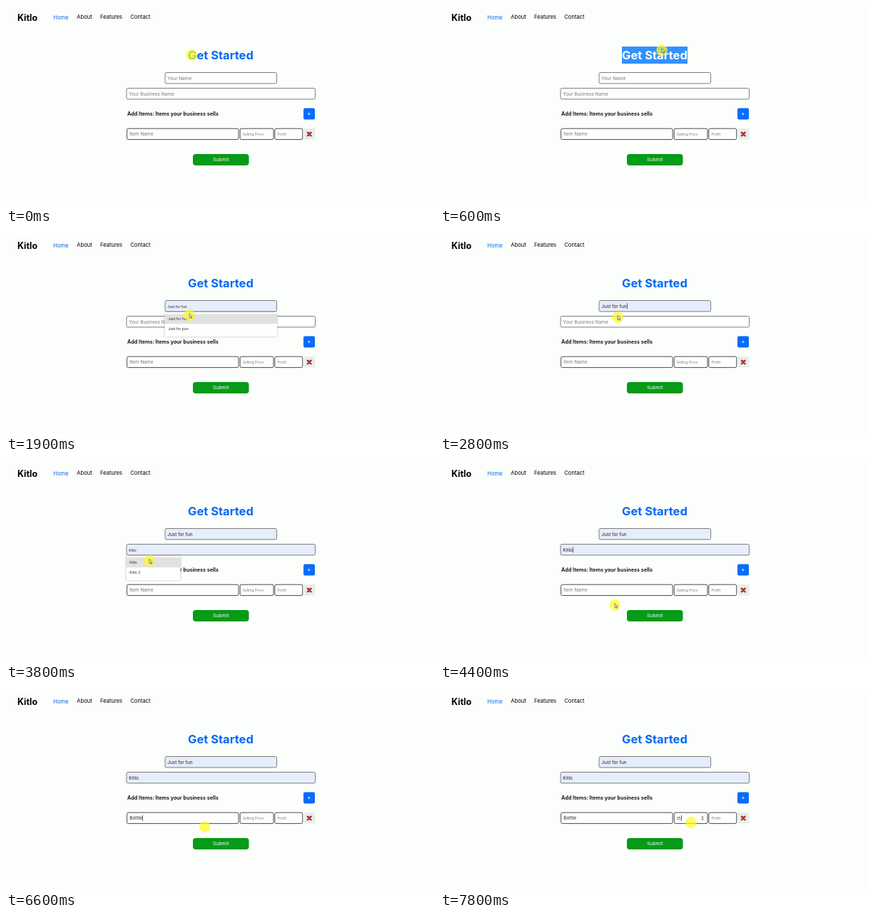
An HTML page that plays this animation: 600x281 px, repeating every 8 s.

```html
<!DOCTYPE html>
<html lang="en">
<head>
<meta charset="utf-8">
<title>Form demo</title>
<style>
  html, body { margin: 0; width: 100%; height: 100%; overflow: hidden; background: #fcfefc; }
  svg { display: block; width: 100%; height: 100%; font-family: Inter, Roboto, sans-serif; }
  .nav { font-size: 7.6px; }
  .title { font-size: 16.5px; font-weight: 700; }
  .field { fill: #fdfffd; stroke: #707070; stroke-width: .9; }
  .field.strong { stroke: #4a4a4a; stroke-width: 1; }
  .field.filled { fill: #e6edfb; }
  .input { font-size: 6.5px; fill: #222; }
  .input.narrow, .input.preview { font-size: 5px; }
  .input.empty { fill: #777; }
  .option { font-size: 5px; fill: #222; }
  .menu { filter: drop-shadow(0 .8px 1px #0005); }
</style>
</head>
<body>
<svg viewBox="0 0 600 281">
  <defs>
    <clipPath id="selectionClip"><rect id="clipBox" x="255" y="57" height="24"/></clipPath>
  </defs>

  <text x="16" y="20.5" font-size="12.5" font-weight="700">Kitlo</text>
  <g class="nav">
    <text x="66.3" y="18.6" fill="#0b66e4">Home</text>
    <text x="99.3" y="18.4">About</text>
    <text x="132" y="18.4">Features</text>
    <text x="174.3" y="18.4">Contact</text>
  </g>

  <text class="title" x="255" y="74.6" fill="#0868f2">Get Started</text>
  <g clip-path="url(#selectionClip)">
    <rect x="255" y="57" width="92" height="24" fill="#3390ff"/>
    <text class="title" x="255" y="74.6" fill="#fff">Get Started</text>
  </g>

  <text x="170" y="154.2" font-size="7.25" font-weight="600">Add Items: Items your business sells</text>
  <rect x="417" y="143.5" width="16" height="16" rx="2" fill="#086cfa"/>
  <path d="M423 151.6h3.6M424.8 149.8v3.6" stroke="#fff" stroke-width=".8"/>

  <g id="fields"></g>

  <g id="spinner">
    <rect x="365.8" y="176.3" width="4.6" height="7.6" fill="#ededed"/>
    <path d="M366.9 179.2l1.2-1.6 1.2 1.6zM366.9 181.1l1.2 1.6 1.2-1.6z" fill="#444"/>
  </g>

  <rect x="417.5" y="172" width="16" height="15.5" rx="2" fill="#ececec"/>
  <g fill="none" stroke-linecap="round">
    <path d="M423 177.8l4.4 4.4m0-4.4l-4.4 4.4" stroke="#5c2018" stroke-width="2.5"/>
    <path d="M423 177.8l4.4 4.4m0-4.4l-4.4 4.4" stroke="#cf3524" stroke-width="1.3"/>
  </g>

  <rect x="262" y="208" width="78.5" height="16" rx="4" fill="#069b18"/>
  <text x="301.2" y="218.3" font-size="6.8" fill="#fff" text-anchor="middle">Submit</text>

  <g id="menus"></g>

  <g id="pointer">
    <circle r="7.9" fill="#fffb1e" opacity=".7"/>
    <path id="arrow" d="M0-2.5v6l1.4-1.2 1 2.2 1-.5-1-2.1h1.8z" fill="#fff" stroke="#333" stroke-width=".6"/>
  </g>
</svg>

<script>
const LOOP = 8000, STEP = 100;
const byId = id => document.getElementById(id);
const within = (t, from, to) => t >= from && t < to;
const show = (node, visible) => node.setAttribute('visibility', visible ? 'visible' : 'hidden');

function add(parent, tag, attributes, text = '') {
  const node = document.createElementNS('http://www.w3.org/2000/svg', tag);
  for (const key in attributes) node.setAttribute(key, attributes[key]);
  node.textContent = text;
  return parent.appendChild(node);
}

// values: [time, text]; previewUntil: time at which a hovered suggestion is accepted
const fields = [
  { x: 223, y: 93.5, width: 156.5, pad: 3.3, hint: 'Your Name', autofill: true,
    values: [[1500, 'Just for fun']], previewUntil: 2400, caret: [2400, 3100] },
  { x: 169, y: 115.5, width: 264.5, pad: 3.3, hint: 'Your Business Name', autofill: true,
    values: [[3600, 'Kitlo']], previewUntil: 4000, caret: [4000, 5300] },
  { x: 169.6, y: 172.2, width: 156.5, pad: 3.6, hint: 'Item Name', style: 'strong',
    values: [[5500, 'B'], [5800, 'Bo'], [6000, 'Bot'], [6200, 'Bott'], [6300, 'Bottl'], [6400, 'Bottle']],
    caret: [5400, 7100] },
  { x: 328.2, y: 172.2, width: 46.8, pad: 3.6, hint: 'Selling Price', style: 'strong narrow',
    values: [[7500, '2'], [7800, '25']], caret: [7100, LOOP] },
  { x: 376.8, y: 172.2, width: 38.9, pad: 3.6, hint: 'Profit', style: 'strong narrow',
    values: [], caret: [LOOP, LOOP] },
];

const menus = [
  { x: 222.5, y: 110, width: 157.5, options: ['Just for fun', 'Just for pun'], open: 1200, hover: 1500, close: 2400 },
  { x: 168.5, y: 131.8, width: 76, options: ['Kitlo', 'Kitlo 2'], open: 3200, hover: 3600, close: 4000 },
];

// [time, x, y]
const pointerPath = [
  [0, 260, 69], [400, 348, 68], [600, 311, 62], [900, 265, 97], [1000, 267, 98],
  [1400, 267, 98], [1500, 262, 107], [1700, 258, 113], [1900, 257, 114], [2700, 249, 117],
  [2800, 249, 117], [3200, 205, 125], [3500, 203, 126], [3600, 202, 135], [3800, 201, 139],
  [4000, 201, 139], [4400, 245, 201], [4500, 250, 201], [5000, 236, 184], [6400, 236, 184],
  [6700, 300, 196], [7000, 350, 187], [7200, 352, 186], [LOOP, 352, 186],
];
const arrowTimes = [[300, 850], [1500, 2950], [3600, 4050], [4300, 4800]];

for (const field of fields) {
  const { x, y, width, pad, hint, style = '' } = field;
  field.box = add(byId('fields'), 'rect', { x, y, width, height: 15.4, rx: 2, class: 'field ' + style });
  field.label = add(byId('fields'), 'text', { x: x + pad, y: y + 10, class: 'input' }, hint);
  field.caretLine = add(byId('fields'), 'rect', { y: y + 3.8, width: .7, height: 8, fill: '#222' });
}

for (const menu of menus) {
  const { x, y, width, options } = menu;
  menu.node = add(byId('menus'), 'g', { class: 'menu' });
  add(menu.node, 'rect', { x, y, width, height: 34.3, rx: 1, fill: '#fff' });
  menu.highlight = add(menu.node, 'rect', { x, y: y + 2.3, width, height: 14, fill: '#e1e1e1' });
  options.forEach((option, i) =>
    add(menu.node, 'text', { x: x + 4.8, y: y + 11.2 + 14.2 * i, class: 'option' }, option));
}

function pointerAt(t) {
  const next = pointerPath.findIndex(point => point[0] > t);
  const [t0, x0, y0] = pointerPath[next - 1], [t1, x1, y1] = pointerPath[next];
  const k = (t - t0) / (t1 - t0);
  return [x0 + (x1 - x0) * k, y0 + (y1 - y0) * k];
}

function drawField(field, t) {
  const typed = field.values.filter(value => value[0] <= t).pop();
  const { label, caretLine, caret, style = '' } = field;
  const preview = typed && t < field.previewUntil;
  label.textContent = typed ? typed[1] : field.hint;
  label.setAttribute('class', `input ${style} ${typed ? '' : 'empty'} ${preview ? 'preview' : ''}`);
  field.box.classList.toggle('filled', Boolean(field.autofill && typed));

  const blinkStart = Math.max(caret[0], typed ? typed[0] : 0);
  show(caretLine, within(t, ...caret) && (t - blinkStart) % 1000 < 500);
  caretLine.setAttribute('x', field.x + field.pad + (typed ? label.getComputedTextLength() + .2 : 0));
}

function draw(t) {
  const [x, y] = pointerAt(t);
  byId('pointer').setAttribute('transform', `translate(${x} ${y})`);
  show(byId('arrow'), arrowTimes.some(span => within(t, ...span)));

  const selected = t >= 900 || t === 0 ? 0 : t < 400 ? x - 255 : 92;
  byId('clipBox').setAttribute('width', Math.min(92, selected));

  fields.forEach(field => drawField(field, t));
  show(byId('spinner'), t >= 7000);
  for (const menu of menus) {
    show(menu.node, within(t, menu.open, menu.close));
    show(menu.highlight, within(t, menu.hover, menu.close));
  }
}

const start = performance.now();
function tick() {
  const elapsed = (performance.now() - start) % LOOP;
  draw(Math.floor(elapsed / STEP) * STEP);
  requestAnimationFrame(tick);
}
tick();
</script>
</body>
</html>
```
